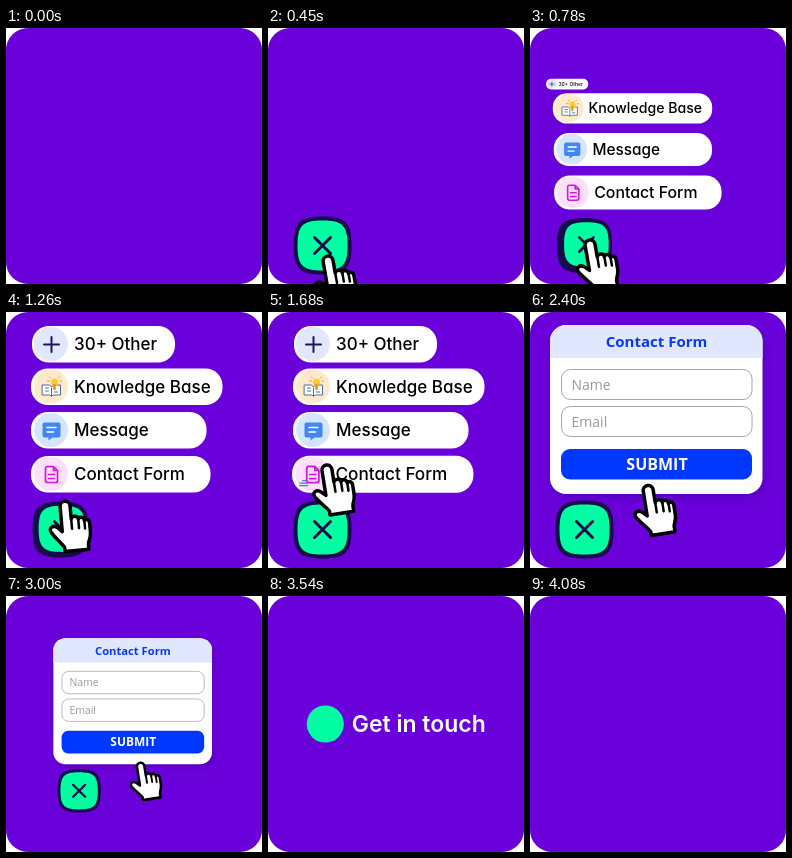
These frames come from a looping animation (256 by 256 pixels, 4.32 s). An HTML page:

```html
<!DOCTYPE html>
<html lang="en">
<head>
<meta charset="utf-8">
<style>
html, body { margin: 0; width: 100%; height: 100%; overflow: hidden; background: #fff }
svg { display: block; width: 100vw; height: 100vh }
.pill text { font: 500 17px Inter, sans-serif; font-feature-settings: "cv11"; fill: #000 }
#form text { font-family: "Open Sans", sans-serif }
#form { filter: drop-shadow(2px 4px 3px rgba(20, 0, 90, .2)) }
.mid { text-anchor: middle; font-weight: 700 }
.line { fill: none; stroke-linecap: round; stroke-linejoin: round }
</style>
</head>
<body>
<svg viewBox="0 0 256 256">
  <rect width="256" height="256" rx="22" fill="#6a00da"/>
  <g id="scene">
    <g id="pills"></g>
    <g id="form">
      <rect x="20" y="13" width="212.500" height="169" rx="16" fill="#fff"/>
      <path d="M20 46V29a16 16 0 0 1 16-16H216.500a16 16 0 0 1 16 16V46Z" fill="#e1e7ff"/>
      <text class="mid" x="126.500" y="35" font-size="15" fill="#0638f5">Contact Form</text>
      <g fill="#fff" stroke="#a5a5ae">
        <rect x="31.500" y="57.500" width="190.500" height="30" rx="9"/>
        <rect x="31.500" y="94.500" width="190.500" height="30" rx="9"/>
      </g>
      <g font-size="14" fill="#9a9aa2">
        <text x="41.500" y="77.500">Name</text>
        <text x="41.500" y="114.500">Email</text>
      </g>
      <rect x="31" y="137" width="191" height="30.500" rx="9" fill="#0038ff"/>
      <text class="mid" x="127" y="158" font-size="16" fill="#fff">SUBMIT</text>
    </g>
    <g id="button" class="line">
      <path d="M0-29C23-29 29-23 29 0S23 29 0 29-29 23-29 0-23-29 0-29Z" fill="#160c4c"/>
      <g id="face">
        <path d="M0-25C20-25 25-20 25 0S20 25 0 25-25 20-25 0-20-25 0-25Z" fill="#00ffa3"/>
        <path d="M-8-8 8 8M8-8-8 8" stroke="#160c4c" stroke-width="3"/>
      </g>
    </g>
    <g id="hand" class="line" stroke="#000">
      <path d="M-5 6a5 5 0 0 1 10 0V19c1-3 7-3 7 1c1-3 6-2 6 2c2-2 5-1 5 3V34c0 7-3 8-3 12V51H-4V47C-7 42-10 40-16 31c-3-5 3-8 7-4l4 4Z" fill="#fff" stroke-width="3.500"/>
      <path d="M5 19V29M12 21V29M18 23V30" stroke-width="2.500"/>
    </g>
  </g>
  <g id="outro">
    <circle cx="-80" r="21" fill="#00ffa3"/>
    <text x="-50" y="9" font-family="Inter, sans-serif" font-size="26" font-weight="600" fill="#fff">Get in touch</text>
  </g>
</svg>
<script>
const LOOP = 4320;
const $ = id => document.getElementById(id);
const ramp = (t, a, b) => Math.min(1, Math.max(0, (t - a) / (b - a)));
const out = p => 1 - (1 - p) ** 3;
const inOut = p => p < .5 ? 2 * p * p : 1 - 2 * (1 - p) ** 2;
const back = p => 1 + 2.2 * (p - 1) ** 3 + 1.2 * (p - 1) ** 2;

// Follows [time, value] keys with one easing per segment.
function follow(t, keys) {
  let v = keys[0][1];
  for (let i = 1; i < keys.length; i++)
    v += (keys[i][1] - keys[i - 1][1]) * inOut(ramp(t, keys[i - 1][0], keys[i][0]));
  return v;
}

// Icons are centred on their disc.
const icons = {
  plus: '<path d="M-7.500 0H7.500M0-7.500V7.500" stroke="#1b1464" stroke-width="2"/>',
  book: `<path d="M-9-2H-2L0 0 2-2H9V8H2L0 9-2 8H-9Z" fill="#fff" stroke="#4b6f9c"/>
    <path d="M0 1V9M-6 1H-3M-6 4H-3M3 5H6" stroke="#4b6f9c"/>
    <path d="M-2-6H-4M9-6H10M-1-9-2-10M7-9 8-10" stroke="#f08a24"/>
    <circle cx="3" cy="-5" r="3.500" fill="#ffc928"/><path d="M3-2V2" stroke="#f08a24" stroke-width="2.500"/>`,
  bubble: `<path d="M-7-8H7Q9-8 9-6V5Q9 7 7 7H1L-3 10V7H-7Q-9 7-9 5V-6Q-9-8-7-8Z" fill="#4285f4"/>
    <path d="M-4.500-3H4.500M-4.500 1.500H2" stroke="#fff" stroke-width="1.600"/>`,
  page: `<path d="M-4-8H2L6-4V6Q6 8 4 8H-4Q-6 8-6 6V-6Q-6-8-4-8ZM2-8V-4H6M-3 0H3M-3 4H3" stroke="#d316dc" stroke-width="1.700"/>
    <path id="mark" d="M-13 8.500H-5M-13 11H-5M-10 6H-7" stroke="#3b7de0" stroke-width="1.200"/>`
};
const pills = [
  ['30+ Other', 26, 14, 143, '#e2e6ff', 'plus', 747],
  ['Knowledge Base', 25, 56.5, 191.5, '#ffe9cb', 'book', 642],
  ['Message', 25, 100, 175.5, '#d5e5ff', 'bubble', 614],
  ['Contact Form', 25, 144, 179.5, '#fddffc', 'page', 597]
].map(([label, x, y, w, tint, icon, start]) => {
  $('pills').insertAdjacentHTML('beforeend', `<g class="pill">
    <rect x="${x}" y="${y}" width="${w}" height="36.500" rx="17" fill="#fff"/>
    <circle cx="45" cy="${y + 18}" r="17" fill="${tint}"/>
    <g class="line" transform="translate(45.500 ${y + 18.5})">${icons[icon]}</g>
    <text x="68" y="${y + 24}">${label}</text></g>`);
  return { el: $('pills').lastElementChild, cy: y + 18, start };
});

const place = (el, x, y, s = 1, turn = 0) =>
  el.setAttribute('transform', `translate(${x} ${y}) rotate(${turn}) scale(${s})`);
const show = (el, on) => el.setAttribute('opacity', +on);
// Scales in place around a point.
const zoom = (el, x, y, s) =>
  el.setAttribute('transform', `translate(${x} ${y}) scale(${s}) translate(${-x} ${-y})`);

function draw(t) {
  for (const p of pills) zoom(p.el, 12, p.cy + 34, out(ramp(t, p.start, p.start + 310)));
  if (t > 1400) zoom(pills[3].el, 115, 162, follow(t, [[1440, 1], [1560, 1.02], [1650, 1.01]]));
  show($('mark'), t > 1600);
  show($('pills'), 1 - ramp(t, 1690, 1850));

  const open = ramp(t, 1740, 2130);
  zoom($('form'), 126, 97, .5 + .5 * back(open));
  show($('form'), ramp(open, 0, .35));

  const hop = follow(t, [[60, 300], [260, 146], [450, 217.5]]);
  const size = follow(t, [[60, .7], [260, 1.28], [450, 1]]);
  const press = follow(t, [[600, 0], [690, 1], [1140, 1], [1440, 0]]);
  place($('button'), 54.5, hop, size - .05 * press);
  place($('face'), 2 * press, -press, 1 - .06 * press);

  const x = follow(t, [[0, 59], [1140, 59], [1500, 57], [1650, 58], [1950, 58], [2640, 136]]);
  const y = follow(t, [[300, 262], [570, 205], [600, 205], [690, 211], [1120, 211],
    [1480, 137], [1650, 152], [1950, 152], [2640, 179]]);
  const turn = follow(t, [[1120, -10], [1260, -5], [1500, -5], [1650, -9]]);
  place($('hand'), x, y, 1, turn);

  zoom($('scene'), 128, 128, 1 - ramp(t, 2850, 3150) ** 2);
  show($('scene'), t >= 60 && t < 3150);

  const end = back(ramp(t, 3360, 3900)) * (1 - ramp(t, 3900, 4080) ** 2);
  place($('outro'), 128, 128, Math.max(0, end));
  show($('outro'), t > 3360 && t < 4080);
}

const begin = performance.now();
function tick() {
  draw((performance.now() - begin) % LOOP);
  requestAnimationFrame(tick);
}
tick();
</script>
</body>
</html>
```
